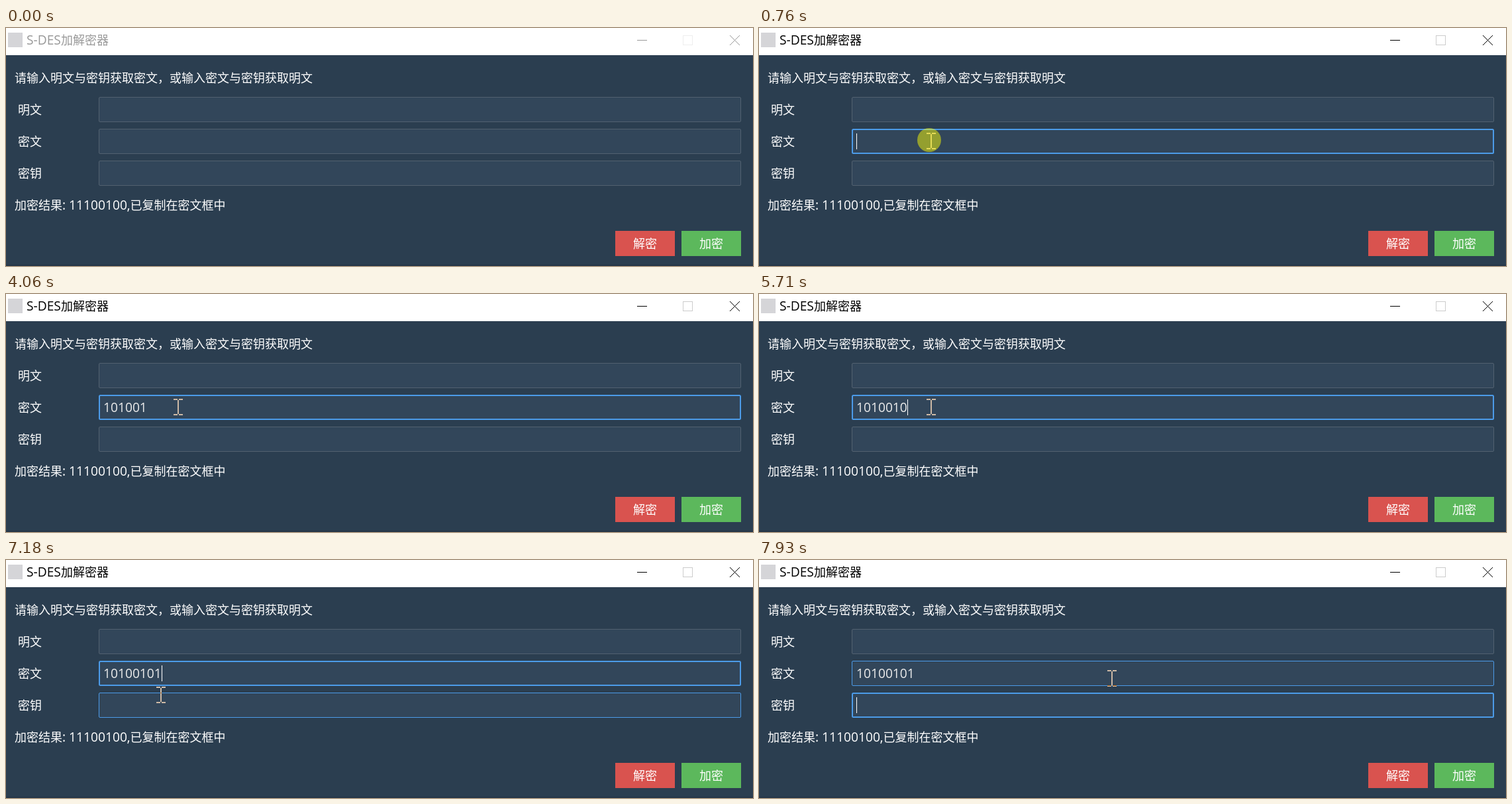
An HTML page with a canvas that plays this animation: 1128x359 px, repeating every 8000 ms.

```html
<!DOCTYPE html>
<html lang="zh">
<head>
<meta charset="utf-8">
<title>S-DES加解密器</title>
<style>
html, body { margin: 0; width: 1128px; height: 359px; overflow: hidden; background: #2b3e50; }
canvas { display: block; }
</style>
</head>
<body>
<canvas width="1128" height="359"></canvas>
<script>
const c = document.querySelector('canvas').getContext('2d', { alpha: false });
const LOOP = 8000, DIGIT = 11, BLUE = '#4c9be8';
const ROWS = [['明文', 104], ['密文', 152], ['密钥', 200]];

// Each list holds [start time, value...]; the latest started entry applies.
const TYPED = [[0, ''], [1360, '1'], [1430, '10'], [1630, '101'], [1830, '1010'], [2090, '10102'],
  [2670, '1010'], [3000, '10100'], [3200, '101001'], [5710, '1010010'], [5780, '10100101']];
const CARET = [[0, 0], [690, 1], [1290, 0], [1630, 1], [2220, 0], [2550, 1], [3130, 0], [3460, 1], [4060, 0],
  [4320, 1], [4920, 0], [5250, 1], [5850, 0], [6180, 1], [6780, 0], [7040, 1]];
const FOCUS = [[0, -1], [690, 1], [7390, 2]];
const CLICK = [[0, 0], [690, 1], [830, 0], [7390, 1], [7530, 0]];
const MOUSE = [[0, -99, -99], [200, 868, 350], [270, 700, 322], [340, 520, 290], [410, 370, 256],
  [480, 295, 226], [550, 266, 196], [620, 260, 176], [690, 260, 170],
  [7040, 254, 175], [7110, 243, 190], [7180, 234, 203], [7250, 230, 216], [7320, 229, 226], [7390, 229, 228],
  [7580, 250, 222], [7650, 380, 195], [7720, 500, 183], [7790, 530, 181], [7860, 532, 180], [7930, 533, 178]];
const at = (list, t) => list.findLast(e => e[0] <= t).slice(1);

function rect(color, x, y, w, h) {
  c.fillStyle = color;
  c.fillRect(x, y, w, h);
}

function text(str, x, y, color) {
  c.fillStyle = color;
  for (const run of str.match(/[ -~]+|[^ -~]+/g) || []) {
    c.font = /[ -~]/.test(run)
      ? '19.2px "Open Sans", "Noto Sans", sans-serif'
      : '18px "Noto Sans CJK SC", "Noto Sans CJK", sans-serif';
    c.fillText(run, x, y);
    x += c.measureText(run).width;
  }
}

function titleBar(active) {
  const ink = active ? '#000' : '#999';
  rect('#fff', 0, 0, 1128, 41);
  rect('#d5d5d8', 3, 7, 22, 22);
  text('S-DES加解密器', 31, 25, ink);
  rect(ink, 953, 18, 15, 1);
  c.lineWidth = 1;
  c.strokeStyle = active ? '#ccc' : '#eee';
  c.strokeRect(1022.5, 11.5, 14, 14);
  c.strokeStyle = ink;
  c.beginPath();
  c.moveTo(1093, 11); c.lineTo(1108, 26);
  c.moveTo(1108, 11); c.lineTo(1093, 26);
  c.stroke();
}

function field(y, focused, hovered) {
  const w = focused ? 2 : 1;
  c.beginPath();
  c.roundRect(140 + w / 2, y + w / 2, 970 - w, 38 - w, 1.5);
  c.fillStyle = '#32465a';
  c.fill();
  c.lineWidth = w;
  c.strokeStyle = focused || hovered ? BLUE : '#526170';
  c.stroke();
}

function button(label, x, color) {
  rect(color, x, 306, 90, 38);
  text(label, x + 27, 332, '#fff');
}

function beam(x, y) {
  c.globalCompositeOperation = 'difference';
  for (const dy of [-12, 11]) {
    rect('#fff', x - 7, y + dy, 6, 2);
    rect('#fff', x + 1, y + dy, 6, 2);
  }
  rect('#fff', x - 1, y - 10, 2, 21);
  c.globalCompositeOperation = 'source-over';
}

function arrow(x, y) {
  const shape = [[0, 0], [0, 23], [5, 18], [9, 26], [13, 24], [9, 17], [16, 17]];
  c.beginPath();
  shape.forEach(([dx, dy]) => c.lineTo(x + dx, y + dy));
  c.closePath();
  c.fillStyle = '#fff';
  c.fill();
  c.lineWidth = 1;
  c.strokeStyle = '#000';
  c.stroke();
}

function draw(t) {
  const [mx, my] = at(MOUSE, t), [focus] = at(FOCUS, t), [typed] = at(TYPED, t);
  const inside = y => mx >= 140 && mx < 1110 && my >= y && my < y + 38;

  rect('#2b3e50', 0, 0, 1128, 359);
  rect('#253648', 0, 357, 1128, 2);
  titleBar(focus >= 0);
  text('请输入明文与密钥获取密文,或输入密文与密钥获取明文'.replace(',', '\uff0c'), 13, 82, '#fff');
  ROWS.forEach(([label, y], i) => {
    text(label, 18, y + 26, '#fff');
    field(y, i === focus, inside(y));
  });
  text(typed, 147, 178, '#ebebeb');
  text('加密结果: 11100100,已复制在密文框中', 13, 274, '#fff');
  button('解密', 920, '#d9534f');
  button('加密', 1020, '#5cb85c');

  if (at(CARET, t)[0]) {
    const n = focus === 1 ? typed.length : 0;
    rect('#fff', 147 + DIGIT * n, ROWS[focus][1] + 7, 1, 24);
  }
  if (ROWS.some(([, y]) => inside(y))) beam(mx, my);
  else arrow(mx, my);
  if (at(CLICK, t)[0]) {
    c.beginPath();
    c.arc(mx - 3, my - 1, 18, 0, 2 * Math.PI);
    c.fillStyle = 'rgba(255, 255, 0, .48)';
    c.fill();
  }
}

const start = performance.now();
function tick() {
  draw((performance.now() - start) % LOOP);
  requestAnimationFrame(tick);
}
tick();
</script>
</body>
</html>
```
